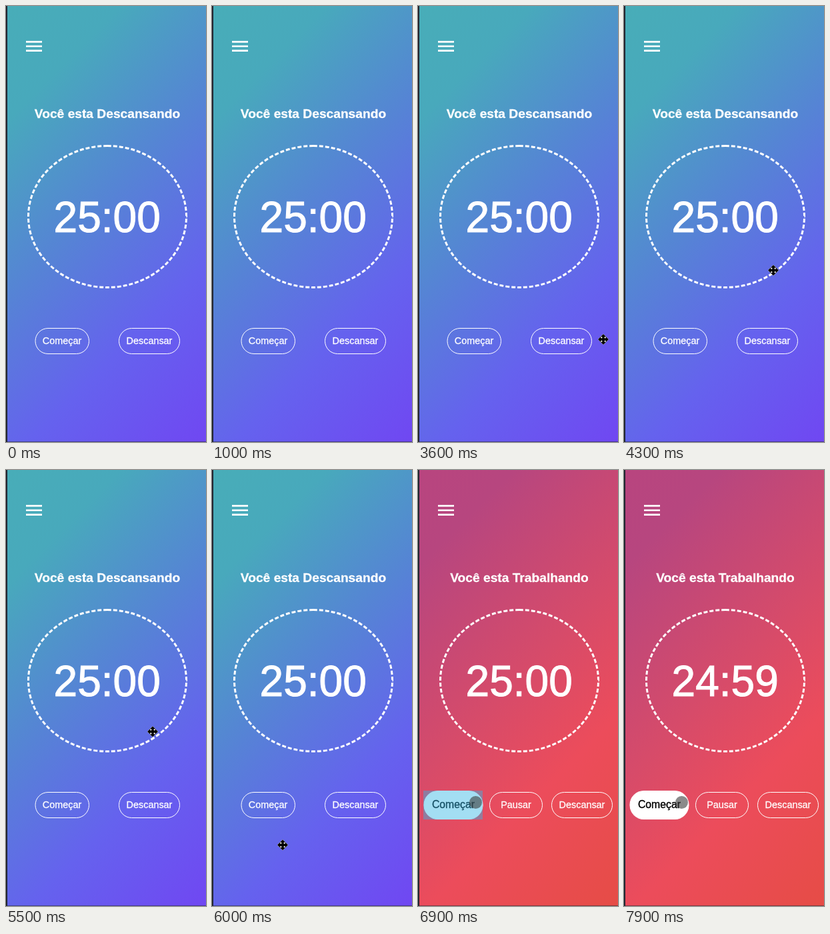
Recreate the animation shown at these times as an HTML page. Size 300 by 650 pixels, loop 8000 ms.

```html
<!DOCTYPE html>
<html lang="pt">
<head>
<meta charset="utf-8">
<title>Pomodoro</title>
<style>
  html, body { margin: 0; width: 100%; height: 100%; overflow: hidden; }
  body { background: #20242f; }
  .stage {
    position: relative; width: 300px; height: 650px; overflow: hidden;
    font-family: "Liberation Sans", Arial, sans-serif;
  }
  .rest, .work { position: absolute; inset: 0 0 0 2px; box-shadow: inset 0 -1px #20242f80; }
  .rest { background: linear-gradient(135deg, #48adb8, #48a9bc 18%, #5585d4 45%, #6562ee 72%, #7047f2); }
  .work { background: linear-gradient(135deg, #b8457f, #b7467f 15%, #d64b6a 48%, #ec4c5b 70%, #e64c46); }
  svg { position: absolute; left: 0; top: 0; }
  .ring { fill: none; stroke: #fff; stroke-width: 3; stroke-dasharray: 6 3; }
  text { fill: #fff; stroke: #fff; stroke-width: .3; text-anchor: middle; }
  .title { font-size: 19.2px; font-weight: bold; }
  .time { font-size: 64px; }
  .time text { stroke-width: 1.1; }
  .label { font-size: 14.4px; }
  .button { fill: none; stroke: #fff; }
  .hover .button { fill: #fff; }
  .hover text { fill: #000; stroke: #000; }

  /* One loop is 8 s, so 100 ms is 1.25% */
  .rest, .work, .start, .end, .tap, .pointer, .touch, .halo {
    animation: 8s step-end infinite;
  }
  .rest { animation-name: until-work; }
  .work { animation-name: from-work; }
  .start { animation-name: until-tick; }
  .end { animation-name: from-tick; }
  .tap { animation-name: tap; }
  .pointer { animation-name: pointer; }
  .touch { animation-name: touch; }
  .halo { animation-name: until-work; }

  @keyframes until-work { 0% { visibility: visible } 86.25%, 100% { visibility: hidden } }
  @keyframes from-work { 0% { visibility: hidden } 86.25%, 100% { visibility: visible } }
  @keyframes until-tick { 0% { opacity: 1 } 98.75%, 100% { opacity: 0 } }
  @keyframes from-tick { 0% { opacity: 0 } 98.75%, 100% { opacity: 1 } }
  @keyframes touch { 0% { opacity: 0 } 82.5%, 100% { opacity: 1 } }
  @keyframes tap {
    0% { opacity: 1 } 87.5% { opacity: .67 } 88.75% { opacity: .33 } 90%, 100% { opacity: 0 }
  }
  @keyframes pointer {
    0% { opacity: 0; transform: translate(278px, 497px) }
    45% { opacity: 1; transform: translate(278px, 497px) }
    46.25% { opacity: 1; transform: translate(268px, 480px) }
    47.5% { opacity: 1; transform: translate(257px, 459px) }
    48.75% { opacity: 1; transform: translate(247px, 440px) }
    50% { opacity: 1; transform: translate(239px, 424px) }
    51.25% { opacity: 1; transform: translate(232px, 411px) }
    52.5% { opacity: 1; transform: translate(227px, 401px) }
    53.75% { opacity: 1; transform: translate(224px, 394px) }
    55% { opacity: 1; transform: translate(223px, 391px) }
    68.75% { opacity: 1; transform: translate(220px, 390px) }
    70% { opacity: 1; transform: translate(212px, 406px) }
    71.25% { opacity: 1; transform: translate(195px, 447px) }
    72.5% { opacity: 1; transform: translate(172px, 500px) }
    73.75% { opacity: 1; transform: translate(140px, 545px) }
    75% { opacity: 1; transform: translate(106px, 559px) }
    76.25% { opacity: 1; transform: translate(84px, 546px) }
    77.5% { opacity: 1; transform: translate(81px, 517px) }
    78.75% { opacity: 1; transform: translate(87px, 489px) }
    80% { opacity: 1; transform: translate(86px, 496px) }
    82.5%, 100% { opacity: 0; transform: translate(86px, 496px) }
  }
</style>
</head>
<body>
<div class="stage">
  <div class="rest"></div>
  <div class="work"></div>
  <svg width="300" height="650" viewBox="0 0 300 650">
    <path fill="#fff" d="M30 52h24v2.67H30zM30 58.67h24v2.67H30zM30 65.33h24V68H30z"/>
    <!-- 79 dashes and 78 gaps, so two dashes meet at the top -->
    <path class="ring" pathLength="708" d="M152 208.5a118.5 105.5 0 0 1 0 211a118.5 105.5 0 0 1 0-211"/>
    <g class="time">
      <text class="start" x="151.7" y="337.3">25:00</text>
      <text class="end" x="151.7" y="337.3">24:59</text>
    </g>

    <g class="rest">
      <text class="title" x="152" y="167">Você esta Descansando</text>
      <rect class="button" x="44" y="480.5" width="80.5" height="38" rx="19"/>
      <text class="label" x="84" y="504">Começar</text>
      <rect class="button" x="169.5" y="480.5" width="91" height="38" rx="19"/>
      <text class="label" x="215" y="504">Descansar</text>
    </g>

    <g class="work">
      <text class="title" x="152" y="167">Você esta Trabalhando</text>
      <g class="hover" transform="translate(53 499.5) scale(1.1)">
        <rect class="button" x="-40" y="-19" width="80" height="38" rx="19"/>
        <text class="label" y="4.5">Começar</text>
      </g>
      <rect class="button" x="107.5" y="480.5" width="79" height="38" rx="19"/>
      <text class="label" x="147" y="504">Pausar</text>
      <rect class="button" x="200.5" y="480.5" width="91" height="38" rx="19"/>
      <text class="label" x="246" y="504">Descansar</text>
      <rect class="tap" x="8" y="478" width="89" height="43" fill="#33b5e5" fill-opacity=".45"/>
    </g>

    <g class="pointer">
      <path stroke="#fff" stroke-width=".8" paint-order="stroke" d="M0-8L8 0 0 8-8 0Z"/>
      <path fill="#fff" d="M-3.7-3.7h2v2h-2zM1.7-3.7h2v2h-2zM-3.7 1.7h2v2h-2zM1.7 1.7h2v2h-2z"/>
    </g>
    <g class="touch">
      <circle cx="86.5" cy="495.5" r="9.5" fill="#3c3c3c" fill-opacity=".6"/>
      <circle class="halo" cx="86.5" cy="495.5" r="10" fill="none" stroke="#b4b4c8" stroke-opacity=".5" stroke-width="2"/>
    </g>
  </svg>
</div>
</body>
</html>
```
